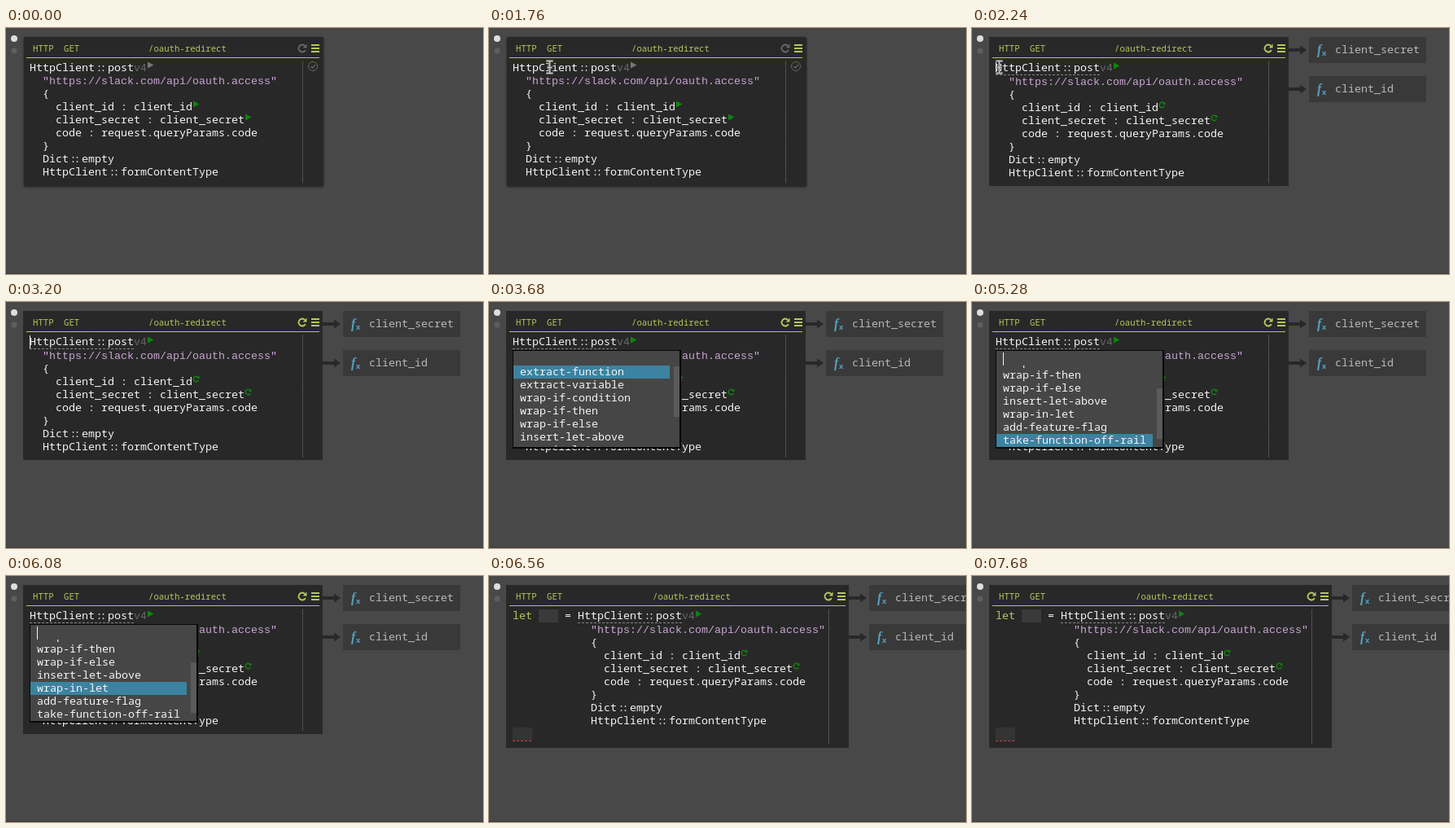
An HTML page with a canvas that plays this animation: 586 by 302 pixels, repeating every 8000 ms.

```html
<!DOCTYPE html>
<html>
<head>
<meta charset="utf-8">
<style>
html, body { margin: 0; width: 586px; height: 302px; overflow: hidden; background: #484848; }
canvas { display: block; }
</style>
</head>
<body>
<canvas id="stage" width="586" height="302"></canvas>
<script>
const ctx = document.getElementById('stage').getContext('2d');
const LOOP = 8000, TICK = 160, CELL = 8;
const MONO = '"Noto Sans Mono", "DejaVu Sans Mono", monospace';
const CODE = '13.333px ' + MONO, SMALL = '10.667px ' + MONO;
const TYPED = '13.333px "Liberation Mono", monospace';
const LIME = '#b3c95c', GREEN = '#0c860c', DARK = '#282828', WHITE = '#f4f4f4';

const COMMANDS = ['extract-function', 'extract-variable', 'wrap-if-condition', 'wrap-if-then',
  'wrap-if-else', 'insert-let-above', 'wrap-in-let', 'add-feature-flag', 'take-function-off-rail'];
const BODY = ['{', '  client_id : client_id', '  client_secret : client_secret',
  '  code : request.queryParams.code', '}', 'Dict::empty', 'HttpClient::formContentType'];

// [time, value...]: each entry holds until the next one
const MOUSE = [[160, 98, 90], [320, 88, 79], [480, 66, 62], [640, 44, 48], [800, 35, 41],
  [960, 48, 44], [1120, 66, 47], [1760, 74, 48], [1920, 60, 48], [2080, 42, 48], [2240, 33, 48], [2400]];
const PICK = [[3680, 0, 0], [4480, 1, 0], [4640, 2, 0], [4800, 3, 0], [4960, 4, 0],
  [5120, 6, 12], [5280, 8, 44], [5440, 7, 44], [6080, 6, 44]];
const FOCUS = 2240, MENU = 3680, LET = 6560;

const held = (keys, t) => keys.filter(k => k[0] <= t).pop() || [0];

function rect(x, y, w, h, color) {
  ctx.fillStyle = color;
  ctx.fillRect(x, y, w, h);
}

function text(s, x, y, color = WHITE, font = CODE) {
  ctx.font = font;
  ctx.fillStyle = color;
  ctx.fillText(s, x, y);
}

// Code text with the two colons of "::" drawn close together
function code(s, x, y) {
  const i = s.indexOf('::');
  if (i < 0) return text(s, x, y);
  text(s.slice(0, i), x, y);
  text(':', x + i * CELL + 1.5, y);
  text(':', x + (i + 1) * CELL - 1.5, y);
  text(s.slice(i + 2), x + (i + 2) * CELL, y);
}

function shape(points, color) {
  ctx.fillStyle = color;
  ctx.beginPath();
  points.forEach(([x, y]) => ctx.lineTo(x, y));
  ctx.fill();
}

function line(points, color, width = 1, dash = []) {
  ctx.strokeStyle = color;
  ctx.lineWidth = width;
  ctx.setLineDash(dash);
  ctx.beginPath();
  points.forEach(([x, y]) => ctx.lineTo(x, y));
  ctx.stroke();
  ctx.setLineDash([]);
}

function disc(x, y, r, color, outline) {
  ctx.beginPath();
  ctx.arc(x, y, r, 0, 7);
  ctx.fillStyle = ctx.strokeStyle = color;
  ctx.lineWidth = 1;
  outline ? ctx.stroke() : ctx.fill();
}

const play = (x, y, color) => shape([[x, y - 4], [x + 7.5, y], [x, y + 4]], color);

function reload(x, y, r, color) {
  ctx.strokeStyle = color;
  ctx.lineWidth = r * 0.36;
  ctx.beginPath();
  ctx.arc(x, y, r * 0.8, 0.5, 5.5);
  ctx.stroke();
  shape([[x + r, y - r], [x + r, y - r * 0.1], [x + r * 0.1, y - r * 0.1]], color);
}

function header(shift, focused) {
  text('HTTP', 33, 29, LIME, SMALL);
  text('GET', 71, 29, LIME, SMALL);
  text('/oauth-redirect', 175 + Math.floor(shift / 2), 29, LIME, SMALL);
  reload(364 + shift, 25, 5.5, focused ? LIME : '#686868');
  for (const y of [20, 24, 28]) rect(375 + shift, y, 10, 2, LIME);
  rect(25, 36, 360 + shift, 1, LIME);
}

function panel(shift, focused, bottom) {
  ctx.save();
  if (!focused) {
    ctx.shadowColor = '#0009';
    ctx.shadowBlur = 3;
    ctx.shadowOffsetY = 1;
  }
  ctx.fillStyle = DARK;
  ctx.beginPath();
  if (focused) ctx.rect(21, 11, 368 + shift, bottom - 11);
  else ctx.roundRect(22, 11, 368, bottom - 11, 2);
  ctx.fill();
  ctx.restore();
  if (focused) rect(21, 0, 368 + shift, 11, '#484848');
  header(shift, focused);
  line([[364.5 + shift, 41], [364.5 + shift, bottom - 4]], '#7a7a7a', 1, [1, 1]);
  if (!focused) {
    disc(377, 47, 5.5, '#666', true);
    line([[374.5, 47], [376.5, 49], [380, 45]], '#666', 1.3);
  }
}

function program(x, focused) {
  const drop = focused ? 1 : 0;
  code('HttpClient::post', x, 53);
  text('v4', x + 128, 53, '#666');
  play(x + 145, 45.5 + drop, focused ? GREEN : '#777');
  if (focused) line([[x, 57.5], [x + 128, 57.5]], '#858585', 1, [3, 2]);
  const left = x + 16;
  text('"https://slack.com/api/oauth.access"', left, 69 + drop, '#c9a5d3', TYPED);
  BODY.forEach((s, i) => code(s, left, 85 + drop + i * 16));
  [[201, 93], [265, 109]].forEach(([dx, y]) => focused
    ? reload(x + dx + 3.5, y + 1.5, 4, GREEN)
    : play(x + dx, y + 0.5, GREEN));
}

function reference(name, x, y) {
  rect(x - 26, y - 2, 16, 4, DARK);
  shape([[x - 11, y - 5.5], [x - 3, y], [x - 11, y + 5.5]], DARK);
  rect(x, y - 16, 144, 32, '#393939');
  text('f', x + 10, y + 5, '#559fbd', 'italic bold 16px "Liberation Serif", serif');
  text('x', x + 16, y + 7, '#559fbd', 'bold 9px "Open Sans", sans-serif');
  text(name, x + 32, y + 4, '#b8b8b8');
}

function menu(pick, scroll, caret) {
  rect(29, 59, 207, 121, '#080808');
  rect(30, 60, 204, 118, '#464646');
  ctx.save();
  ctx.beginPath();
  ctx.rect(30, 78, 204, 100);
  ctx.clip();
  rect(30, 78 + pick * 16 - scroll, 192, 16, '#3b83a0');
  COMMANDS.forEach((s, i) => text(s, 38, 90 + i * 16 - scroll));
  ctx.restore();
  rect(227, 79 + scroll * 0.62, 7, 62, '#5b5b5b');
  if (caret) rect(38, 62, 1, 16, WHITE);
}

function beam(x, y) {
  const parts = [[x - 3, y - 8, 7, 1], [x, y - 7, 1, 14], [x - 3, y + 7, 7, 1], [x - 2, y, 5, 1]];
  parts.forEach(([l, t, w, h]) => rect(l - 1, t - 1, w + 2, h + 2, '#777'));
  parts.forEach(([l, t, w, h]) => rect(l, t, w, h, '#c8c8c8'));
}

function draw(t) {
  const focused = t >= FOCUS, wrapped = t >= LET;
  const shift = wrapped ? 53 : 0;
  const caret = focused && Math.floor((t - FOCUS) / 480) % 2 === 0;

  rect(0, 0, 586, 302, '#484848');
  rect(0, 301, 586, 1, '#3d393b');
  disc(10, 13, 4, '#dedede');
  disc(10, 28, 3.5, '#5e5e5e');
  if (focused) {
    reference('client_secret', 414 + shift, 27);
    reference('client_id', 414 + shift, 75);
  }
  panel(shift, focused, wrapped ? 211 : 194);
  program(wrapped ? 109 : 29, focused);

  if (wrapped) {
    text('let', 29, 53, LIME);
    rect(61, 41, 24, 16, '#3a3a3a');
    text('=', 93, 53);
    rect(29, 186, 24, 16, '#343434');
    line([[29, 202.5], [53, 202.5]], '#d04040', 1, [3, 2]);
  }
  if (focused && !wrapped && t >= MENU) {
    const [, pick, scroll] = held(PICK, t);
    menu(pick, scroll, caret);
  } else if (caret) {
    rect(t >= 7680 ? 84 : t >= 7520 ? 60 : 29, 41, 1, 16, WHITE);
  }
  const [, x, y] = held(MOUSE, t);
  if (x) beam(x, y);
}

function frame() {
  const t = performance.now() % LOOP;
  draw(Math.floor(t / TICK) * TICK);
  requestAnimationFrame(frame);
}
frame();
</script>
</body>
</html>
```
